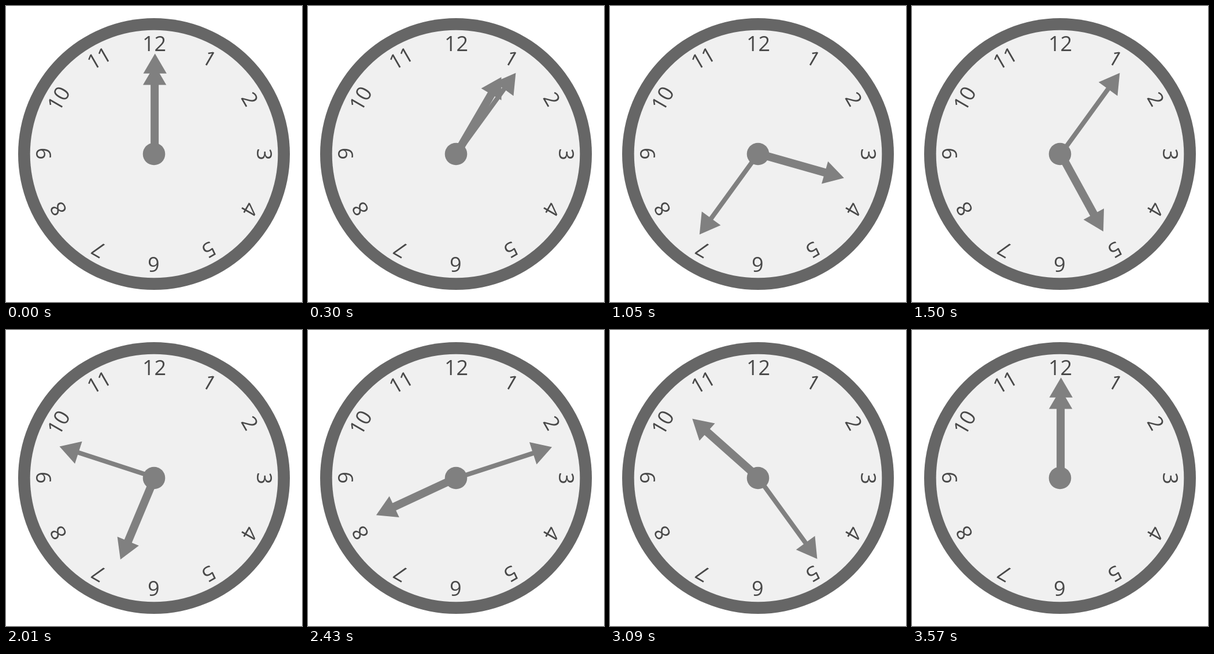
Write an HTML page with a canvas that moves like this. It is 512 px wide and 512 px high and loops after 3.6 s.

```html
<!DOCTYPE html>
<html lang="en">
<head>
<meta charset="utf-8">
<title>Clock</title>
<style>
  html, body { margin: 0; width: 100%; height: 100%; overflow: hidden; background: #fff; }
  canvas { display: block; }
</style>
</head>
<body>
<canvas id="stage" width="512" height="512"></canvas>
<script>
const ctx = document.getElementById('stage').getContext('2d');
const STEP = 30, STEPS = 120, CENTER = 256;
const PIVOT = { x: 257.1, y: 255.5 };
const TURN = Math.PI * 2;
const COLORS = { rim: '#666', face: '#f0f0f0', hand: '#808080', digits: '#484848' };

function disc(radius, color) {
  ctx.fillStyle = color;
  ctx.beginPath();
  ctx.arc(CENTER, CENTER, radius, 0, TURN);
  ctx.fill();
}

function drawNumerals() {
  ctx.fillStyle = COLORS.digits;
  ctx.font = '36px "Open Sans", "Noto Sans", sans-serif';
  ctx.textAlign = 'center';
  for (let hour = 1; hour <= 12; hour++) {
    ctx.save();
    ctx.translate(CENTER, CENTER);
    ctx.rotate(hour / 12 * TURN);
    ctx.fillText(hour, 0.5, -178.2);
    ctx.restore();
  }
}

function drawHand(turns, length, width, shift) {
  const head = length - 34.5;
  ctx.save();
  ctx.translate(PIVOT.x, PIVOT.y);
  ctx.rotate(turns * TURN);
  ctx.translate(shift, 0);
  ctx.fillStyle = COLORS.hand;
  ctx.fillRect(-width / 2, -head - 1, width, head + 1);
  ctx.beginPath();
  ctx.moveTo(0, -length);
  ctx.lineTo(20.2, -head);
  ctx.lineTo(-20.2, -head);
  ctx.fill();
  ctx.restore();
}

// The first revolution takes nine steps, each later one takes ten.
const minuteTurns = step => step < 9 ? step / 9 : (step + 1) / 10;
const hourTurns = step => step / (STEPS - 1);

function draw(time) {
  const step = Math.floor(time / STEP + 0.001) % STEPS;
  ctx.fillStyle = '#fff';
  ctx.fillRect(0, 0, 512, 512);
  disc(235, COLORS.rim);
  disc(214.3, COLORS.face);
  drawNumerals();
  drawHand(minuteTurns(step), 173.2, 8, 0.6);
  drawHand(hourTurns(step), 153.5, 14, 0);
  disc(19.3, COLORS.hand);
}

function tick(now) {
  draw(Math.max(0, now));
  requestAnimationFrame(tick);
}

draw(0);
requestAnimationFrame(tick);
</script>
</body>
</html>
```
